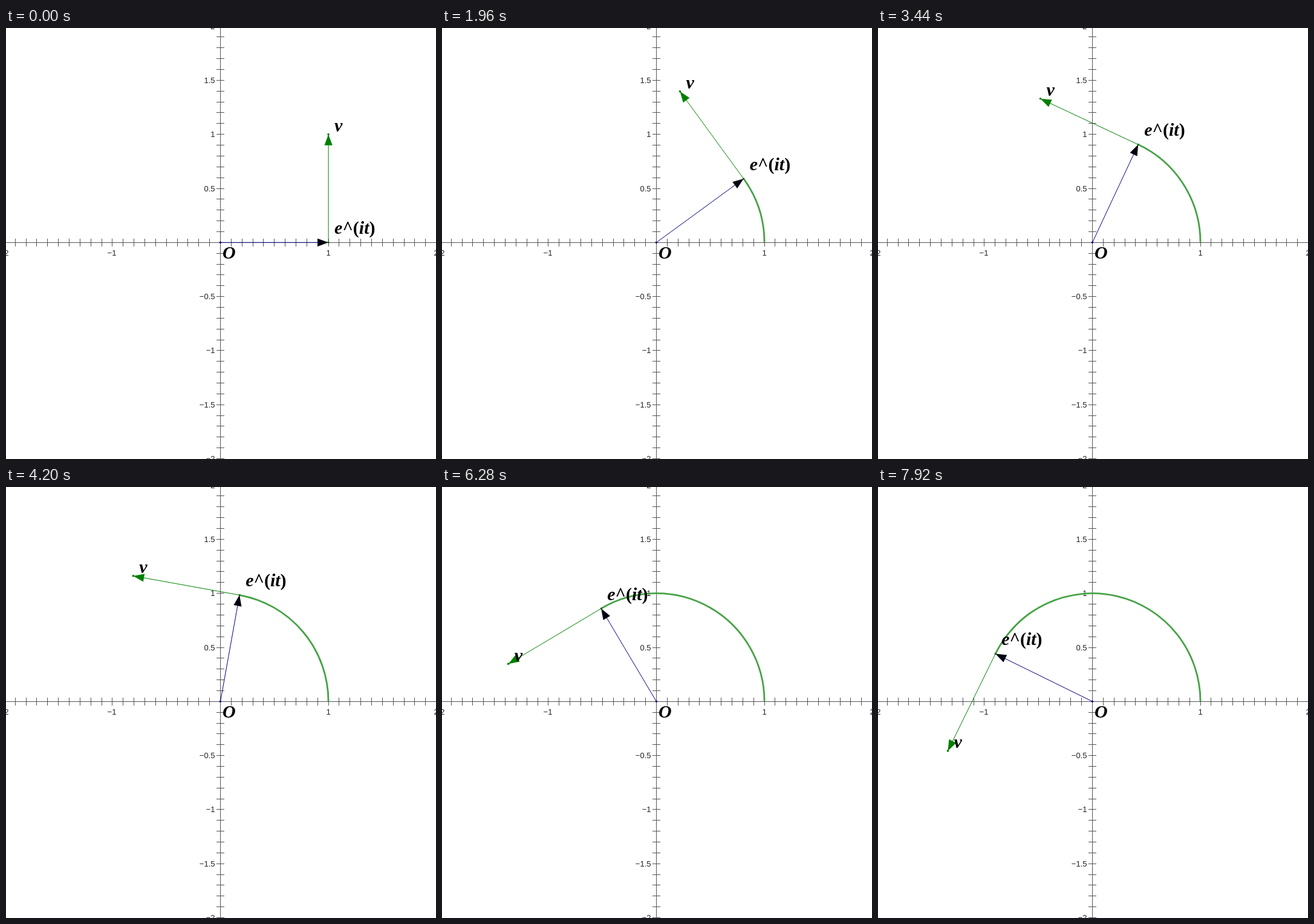
Animation of 711 by 712 pixels, one loop 8000 ms. Source, as an HTML page:

```html
<!DOCTYPE html>
<html lang="en">
<head>
<meta charset="utf-8">
<title>Unit circle vectors</title>
<style>
  html, body { margin: 0; width: 100%; height: 100%; overflow: hidden; background: #fff; }
  svg { display: block; }
  .axis { stroke: #555; stroke-width: 1; fill: none; }
  .num { font: 13px "Liberation Sans", Arial, sans-serif; fill: #222; }
  .name { font: italic bold 30px "Liberation Serif", "Times New Roman", serif; fill: #000; }
  .upright { font-style: normal; }
  .trace { stroke: #46a346; stroke-width: 2.8; fill: none; }
</style>
</head>
<body>
<svg id="stage" width="711" height="712" viewBox="0 0 711 712">
  <path id="axes" class="axis"/>
  <g id="numbers" class="num"></g>
  <path id="trace" class="trace"/>
  <line id="radiusLine" stroke="#000080"/>
  <path id="radiusHead" fill="#000010"/>
  <line id="tangentLine" stroke="#008000"/>
  <path id="tangentHead" fill="#008000"/>
  <circle cx="354.5" cy="354.3" r="1.7" fill="#000080"/>
  <circle id="pointDot" r="1.6" fill="#0a640a"/>
  <circle id="tangentDot" r="1.8" fill="#008000"/>
  <text class="name" x="358" y="380.5">O</text>
  <text id="pointName" class="name">e<tspan class="upright">^(</tspan>it<tspan class="upright">)</tspan></text>
  <text id="tangentName" class="name">v</text>
</svg>
<script>
const LOOP = 8000, UNIT = 178.6, CX = 354.5, CY = 354.3;
const SHORT_STEPS = [16, 29, 44, 66, 79, 94];
// [step, angle in degrees]
const POSES = [
  [0, 0], [11, 14.9], [16, 23.05], [22, 31.6], [33, 48.2], [34, 50.05],
  [44, 64.9], [54, 79.8], [55, 81.9], [66, 98.3], [70, 104.2], [77, 115.1],
  [81, 120.75], [88, 132], [99, 148.8], [102, 153.85]
];
const el = id => document.getElementById(id);
const set = (id, attrs) => {
  for (const key in attrs) el(id).setAttribute(key, attrs[key]);
};
const toScreen = (x, y) => [CX + UNIT * x, CY - UNIT * y];

function addNumber(value, x, y, anchor) {
  const text = document.createElementNS("http://www.w3.org/2000/svg", "text");
  text.textContent = String(value).replace("-", "\u2212");
  text.setAttribute("x", x);
  text.setAttribute("y", y);
  text.setAttribute("text-anchor", anchor);
  el("numbers").append(text);
}

function drawAxes() {
  let d = "M0 354.5H711M354.5 0V712";
  for (let i = -20; i <= 20; i++) {
    if (!i) continue;
    const [x, y] = toScreen(i / 10, i / 10).map(p => Math.floor(p) + 0.5);
    d += `M${x} 348V361M348 ${y}H361`;
    if (i % 10 === 0) addNumber(i / 10, x - 0.5, 376, "middle");
    if (i % 5 === 0) addNumber(i / 10, 345.5, y + 4.5, "end");
  }
  set("axes", { d });
}

function drawArrow(name, [x1, y1], [x2, y2]) {
  const length = Math.hypot(x2 - x1, y2 - y1);
  const ux = (x2 - x1) / length, uy = (y2 - y1) / length;
  const bx = x2 - 18 * ux, by = y2 - 18 * uy, half = 6.6;
  set(name + "Line", { x1, y1, x2, y2 });
  set(name + "Head", {
    d: `M${x2} ${y2}L${bx - half * uy} ${by + half * ux}L${bx + half * uy} ${by - half * ux}Z`
  });
}

function stepAt(time) {
  let step = 0, end = 80;
  while (end <= time && step < 102) {
    step++;
    end += SHORT_STEPS.includes(step) ? 40 : 80;
  }
  return step;
}

function angleAt(step) {
  const i = Math.max(1, POSES.findIndex(pose => pose[0] >= step));
  const [s0, a0] = POSES[i - 1], [s1, a1] = POSES[i];
  return (a0 + (a1 - a0) * (step - s0) / (s1 - s0)) * Math.PI / 180;
}

function draw(time) {
  const angle = angleAt(stepAt(time));
  const c = Math.cos(angle), s = Math.sin(angle);
  const point = toScreen(c, s), tip = toScreen(c - s, s + c);
  drawArrow("radius", [CX, CY], point);
  drawArrow("tangent", point, tip);
  set("trace", {
    d: angle ? `M${CX + UNIT} ${CY}A${UNIT} ${UNIT} 0 0 0 ${point}` : ""
  });
  set("pointDot", { cx: point[0], cy: point[1] });
  set("tangentDot", { cx: tip[0], cy: tip[1] });
  set("pointName", { x: point[0] + 10, y: point[1] - 14.3 });
  set("tangentName", { x: tip[0] + 10, y: tip[1] - 4.5 });
}

drawAxes();
draw(0);
const start = performance.now();
(function tick() {
  draw((performance.now() - start) % LOOP);
  requestAnimationFrame(tick);
})();
</script>
</body>
</html>
```
